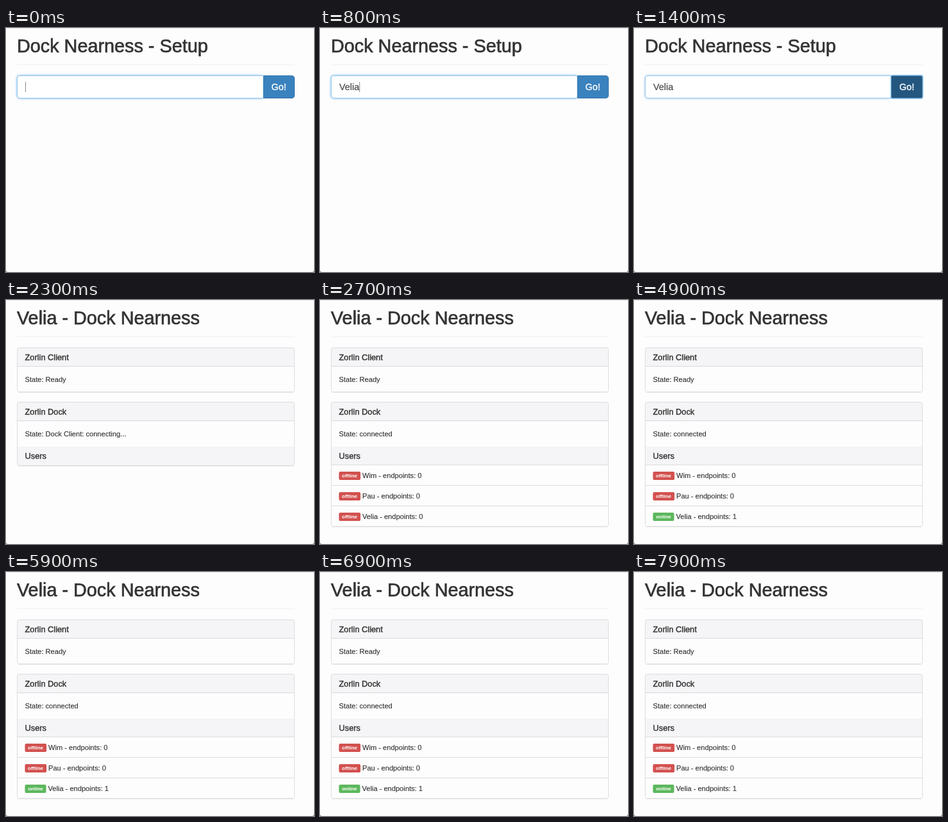
Write an HTML page that moves like this. It is 480 by 381 pixels and loops after 8 s.

```html
<!DOCTYPE html>
<html lang="en">
<head>
<meta charset="utf-8">
<title>Dock Nearness</title>
<style>
  html, body { margin: 0; width: 100%; height: 100%; overflow: hidden; background: #fefdfe; }
  svg { display: block; width: 480px; height: 381px; }
  text { font: 11.1px "Liberation Sans", Arial, sans-serif; fill: #333; stroke: #333; stroke-width: .15; white-space: pre; }
  .title { font-size: 28.8px; stroke-width: .65; }
  .heading { font-size: 12.8px; stroke-width: .4; }
  .field { font-size: 14.4px; fill: #444; stroke: #444; }
  .go { font-size: 14.4px; fill: #fff; stroke: #fff; stroke-width: .35; }
  .badge { font-size: 8px; font-weight: bold; fill: #fff; stroke: none; text-anchor: middle; }
  .frame { fill: none; stroke: #ddd; }
  .band { fill: #f5f4f6; }
  .line { stroke: #ddd; }
  .shadow { stroke: #000; stroke-opacity: .07; }
</style>
</head>
<body>
<svg viewBox="0 0 480 381">
  <defs><filter id="blur" x="-5%" y="-50%" width="110%" height="200%"><feGaussianBlur stdDeviation="1.6"/></filter></defs>
  <rect width="480" height="381" fill="#fefdfe"/>
  <path d="M0 .25H480" stroke="#ccc" stroke-width=".5"/>
  <path d="M0 378V381H3Q0 381 0 378M480 378V381H477Q480 381 480 378" fill="#777"/>
  <text id="title" class="title" x="17" y="38"></text>
  <path d="M17 57.5H450" stroke="#f1f0f1"/>

  <g id="setup">
    <rect id="glow" x="17.5" y="74.5" width="384" height="35" rx="4.5" fill="none" stroke="#66afe9" stroke-width="3" filter="url(#blur)"/>
    <path id="input" d="M401 74.5H22Q17.5 74.5 17.5 79V105Q17.5 109.5 22 109.5H401Z" fill="#fff" stroke="#8fc5ea"/>
    <text id="name" class="field" x="30" y="96.5"></text>
    <path id="caret" d="M30.5 84V100" stroke="#888"/>
    <path id="button" d="M401.5 74.5H445Q449.5 74.5 449.5 79V105Q449.5 109.5 445 109.5H401.5Z"/>
    <rect id="ring" x="400.5" y="74" width="49.5" height="36" rx="2" fill="none" stroke="#7dbbe8" stroke-width="1.5"/>
    <text class="go" x="413.5" y="96.5">Go!</text>
  </g>

  <g id="status">
    <g id="panels"></g>
    <text id="state" x="29.5" y="213"></text>
    <g id="users"></g>
  </g>
</svg>
<script>
const LOOP = 8000;
const USER = 'Velia';
const APP = 'Dock Nearness';
const HOVER = 1000, PRESS = 1350, SUBMIT = 1500, CONNECTING = 1800, CONNECTED = 2400, LIST = 2500, ONLINE = 3300;

const $ = id => document.getElementById(id);
const show = (id, on) => $(id).setAttribute('visibility', on ? 'inherit' : 'hidden');
const setText = (id, value) => { if ($(id).textContent !== value) $(id).textContent = value; };
const heading = (y, label) => `<text class="heading" x="29.5" y="${y}">${label}</text>`;

const panel = (top, label) => `
  <rect class="band" x="17.5" y="${top}" width="432" height="30" rx="3"/>
  <path class="line" d="M17.5 ${top + 29}H449.5"/>
  ${heading(top + 19.5, label)}`;

const frame = (top, bottom, id) => `
  <g id="${id}">
    <path class="shadow" d="M19 ${bottom + 1}H448"/>
    <rect class="frame" x="17.5" y="${top}" width="432" height="${bottom - top}" rx="3"/>
  </g>`;

const row = (name, index, online, id) => {
  const y = 258 + 32 * index;
  return `<g id="${id}">
    <rect x="29.5" y="${y + 10}" width="${online ? 33 : 33.6}" height="13" rx="2" fill="${online ? '#5cb85c' : '#d2524f'}"/>
    <text class="badge" x="46" y="${y + 19.3}">${online ? 'online' : 'offline'}</text>
    <text x="${online ? 65.5 : 66}" y="${y + 20}">${name} - endpoints: ${online ? 1 : 0}</text>
  </g>`;
};

$('panels').innerHTML = panel(74.5, 'Zorlin Client') + frame(74.5, 143.5, 'clientFrame')
  + '<text x="29.5" y="128">State: Ready</text>'
  + panel(159.5, 'Zorlin Dock')
  + '<rect class="band" x="18" y="229" width="431" height="29"/>' + heading(248, 'Users')
  + frame(159.5, 258.5, 'shortFrame');

$('users').innerHTML = frame(159.5, 353.5, 'tallFrame')
  + '<path class="line" d="M17.5 257.5H449.5M17.5 289.5H449.5M17.5 321.5H449.5"/>'
  + row('Wim', 0, false, 'first') + row('Pau', 1, false, 'second')
  + row(USER, 2, false, 'away') + row(USER, 2, true, 'here');

function drawSetup(t) {
  const typed = Math.max(0, Math.min(USER.length, Math.floor((t - 60) / 140)));
  const pressed = t >= PRESS;
  setText('name', USER.slice(0, typed));
  $('caret').setAttribute('transform', `translate(${typed ? $('name').getComputedTextLength() : 0} 0)`);
  show('caret', t < 1200);
  $('glow').setAttribute('opacity', .6 * Math.max(0, 1 - Math.max(0, t - PRESS) / 150));
  $('button').setAttribute('fill', pressed ? '#24577f' : t >= HOVER ? '#286090' : '#3a82be');
  $('button').setAttribute('stroke', pressed ? '#1d4a70' : '#3777b0');
  show('ring', pressed);
}

function drawStatus(t) {
  setText('state', 'State: ' + (t >= CONNECTED ? 'connected'
    : 'Dock Client: ' + (t < CONNECTING ? 'created' : 'connecting...')));
  show('shortFrame', t < LIST);
  show('users', t >= LIST);
  show('away', t >= LIST && t < ONLINE);
  show('here', t >= ONLINE);
}

function draw(now) {
  const t = now % LOOP;
  const submitted = t >= SUBMIT;
  setText('title', submitted ? `${USER} - ${APP}` : `${APP} - Setup`);
  show('setup', !submitted);
  show('status', submitted);
  // Children set to "inherit" follow the visibility of their hidden group.
  if (submitted) drawStatus(t);
  else {
    drawSetup(t);
    ['shortFrame', 'users', 'away', 'here'].forEach(id => show(id, false));
  }
  requestAnimationFrame(draw);
}

draw(0);
</script>
</body>
</html>
```
